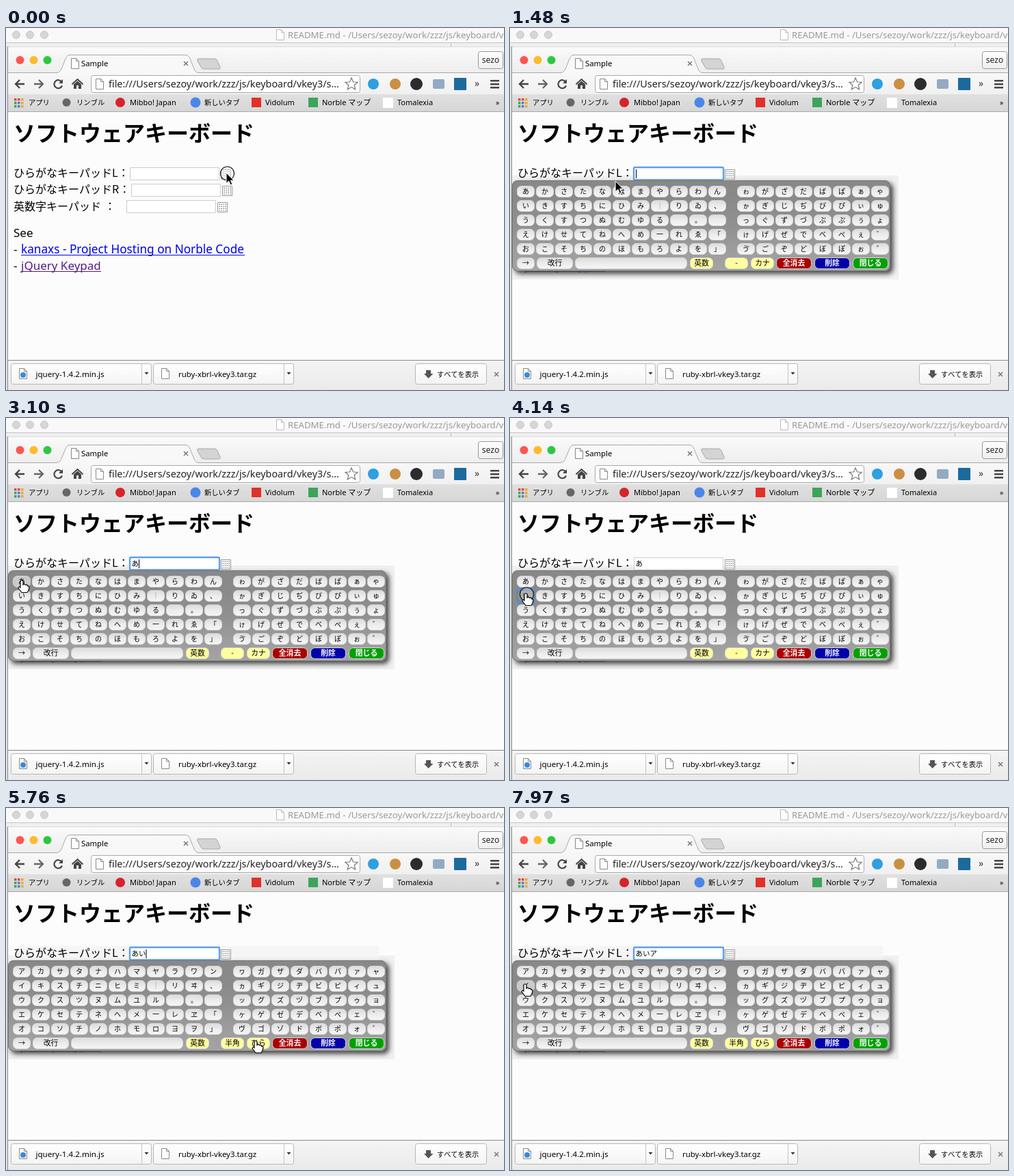
Animation, 728 px wide and 530 px high, one loop 8 s. Source, as an HTML page with a canvas:

```html
<!DOCTYPE html>
<html lang="ja">
<head>
<meta charset="utf-8">
<style>
html, body { margin: 0; width: 100%; height: 100%; overflow: hidden; }
canvas { display: block; }
</style>
</head>
<body>
<canvas id="stage" width="728" height="530"></canvas>
<script>
const g = document.getElementById('stage').getContext('2d');
const UI = '"Noto Sans", "Noto Sans CJK JP", "Noto Sans CJK", sans-serif';
const JP = '"Noto Sans CJK JP", "Noto Sans CJK", sans-serif';
const LOOP = 8000, TICK = 147.5;

function text(s, x, y, size, color = '#000', { font = UI, align = 'left', weight = 400 } = {}) {
  g.font = `${weight} ${size}px ${font}`;
  g.textAlign = align;
  g.fillStyle = color;
  g.fillText(s, x, y);
}
function paint(path, fill, stroke, width = 1) {
  if (fill) { g.fillStyle = fill; g.fill(path); }
  if (stroke) { g.strokeStyle = stroke; g.lineWidth = width; g.stroke(path); }
}
function box(x, y, w, h, fill, stroke, r = 0, width = 1) {
  const p = new Path2D();
  p.roundRect(x, y, w, h, r);
  paint(p, fill, stroke, width);
}
function dot(x, y, r, fill, stroke, width) {
  const p = new Path2D();
  p.arc(x, y, r, 0, 7);
  paint(p, fill, stroke, width);
}
function shape(d, fill, stroke, width, x = 0, y = 0) {
  g.save();
  g.translate(x, y);
  paint(new Path2D(d), fill, stroke, width);
  g.restore();
}
function fade(y0, y1, ...colors) {
  const f = g.createLinearGradient(0, y0, 0, y1);
  colors.forEach((c, i) => f.addColorStop(i / (colors.length - 1), c));
  return f;
}
const sheet = (x, y, color = '#888') =>
  shape('M.5 .5h7l4 4v11h-11zM7.5 .5v4h4', '#fff', color, 1, x, y);
const cross = (x, y) => shape('M-3-3L3 3M3-3L-3 3', null, '#777', 1.5, x, y);

function browser() {
  box(0, 0, 728, 530, '#fcfcfc');
  // window behind
  box(0, 0, 728, 21, '#f9f9f9');
  box(0, 21, 728, 6, '#efefef');
  box(0, 21, 728, 1, '#c4c4c4');
  box(650, 22, 1, 5, '#bbb');
  for (const x of [15, 35, 56]) dot(x, 10, 5.5, '#d6d6d6', '#c8c8c8');
  sheet(395, 2, '#bbb');
  text('README.md - /Users/sezoy/work/zzz/js/keyboard/vkey3', 412, 15, 13.2, '#999');

  // tab strip
  box(2, 27, 726, 38, fade(27, 65, '#fafafa', '#eeeeee'));
  box(2, 27, 726, 1, '#dcdcdc');
  ['#fc5650', '#fdbb2e', '#2cc83e'].forEach((c, i) => dot(20.5 + i * 20, 47, 6, c));
  shape('M281 45h24q3 0 4 3l4 9q1 3-2 3h-22q-3 0-4-3l-5-9q-1-3 1-3z', '#d4d4d4', '#a8a8a8');
  box(2, 65, 726, 32, fade(65, 97, '#f8f8f8', '#f0f0f0'));
  shape('M2 65.5H74Q79 65 81 60L87 45Q89 39.5 94 39.5H262Q267 39.5 269 45L275 60Q277 65 282 65.5', '#f8f8f8');
  shape('M2 65.5H74Q79 65 81 60L87 45Q89 39.5 94 39.5H262Q267 39.5 269 45L275 60Q277 65.5 282 65.5H728', null, '#a8a8a8');
  sheet(95, 44);
  text('Sample', 110, 56, 11.3);
  cross(263, 52);
  box(690.5, 34.5, 36, 25, fade(34, 60, '#fff', '#eee'), '#999', 3);
  text('sezo', 708.5, 51, 12, '#222', { align: 'center' });

  // toolbar
  shape('M27 82H14M20 76L14 82L20 88', null, '#444', 2.3);
  shape('M41 82H54M48 76L54 82L48 88', null, '#666', 2.3);
  shape('M81.500 79A6 6 0 1 0 82 84.500', null, '#444', 2.2);
  shape('M83 75v6h-6z', '#444');
  shape('M96.500 82.500L104.500 75L112.500 82.500', null, '#444', 2);
  shape('M99 82.500L104.500 77.500L110 82.500V89H106V84H103V89H99z', '#444');
  box(124.5, 69.5, 393, 25, '#fff', '#aaa', 3);
  sheet(131, 74);
  text('file:///Users/sezoy/work/zzz/js/keyboard/vkey3/s...', 150, 87, 14.35, '#222');
  shape('M0-9L2.600-3L9-2.500L4.200 1.700L5.700 8L0 4.600L-5.700 8L-4.200 1.700L-9-2.500L-2.600-3z', '#fff', '#777', 1.2, 505, 82);
  dot(537, 82, 8, '#2f9fe0');
  dot(569, 82, 8, '#c98f45');
  dot(600, 82, 9, '#2c2c2c');
  box(624, 75, 17, 14, '#93abc2', null, 2);
  box(655, 73, 18, 18, '#1b6a9c', null, 1);
  text('»', 685, 86, 14, '#333');
  for (let i = 0; i < 3; i++) box(708, 76 + i * 5, 13, 2.5, '#444');

  // bookmarks
  box(2, 97, 726, 26, fade(97, 123, '#e0e0e0', '#d6d6d6'));
  box(2, 122, 726, 1, '#a8a8a8');
  for (let i = 0; i < 9; i++)
    box(12 + i % 3 * 5, 103 + Math.floor(i / 3) * 5, 3.5, 3.5,
      ['#e04a3a', '#e04a3a', '#eda928', '#3fa657', '#4a82dd', '#eda928', '#3fa657', '#4a82dd', '#eda928'][i]);
  dot(88.5, 109, 6, '#666');
  dot(167, 109, 7, '#d6242c');
  dot(277, 109, 7.5, '#4a86e8');
  box(359, 102, 14, 14, '#e0302a');
  box(442, 102, 14, 14, '#3da45b');
  box(551, 102, 15, 15, '#fff');
  [['アプリ', 33], ['リンブル', 103], ['Mibbo! Japan', 181], ['新しいタブ', 290],
    ['Vidolum', 379], ['Norble マップ', 462], ['Tomalexia', 572], ['»', 716]]
    .forEach(([s, x]) => text(s, x, 113, /^[ -~]/.test(s) ? 11 : 10.3));

  // downloads
  box(2, 487, 726, 43, fade(487, 530, '#f4f4f4', '#eaeaea'));
  box(2, 486, 726, 1, '#8a8a8a');
  for (const x of [7.5, 215.5]) {
    box(x, 491.5, 205, 30, fade(491, 521, '#fff', '#f4f4f4'), '#b8b8b8', 3);
    box(x + 190.5, 492, 1, 29, '#c4c4c4');
    shape('M0 0h6l-3 3.500z', '#333', null, 1, x + 195, 504);
  }
  sheet(19, 498);
  dot(25, 508, 4, '#3b8ad8');
  sheet(227, 498);
  text('jquery-1.4.2.min.js', 43.5, 511, 11.6);
  text('ruby-xbrl-vkey3.tar.gz', 252, 511, 11.35);
  box(598.5, 491.5, 104, 30, fade(491, 521, '#fff', '#f4f4f4'), '#b8b8b8', 3);
  shape('M614 501h7v5h3.500L617.500 513L611 506h3z', '#555');
  text('すべてを表示', 630, 510.5, 10.2);
  cross(717, 507);
  box(0, 27, 2, 503, '#e2e2e2');
  box(2, 27, 1, 503, '#8c8c8c');
}

function padIcon(x, y) {
  box(x + .5, y + .5, 14, 14, '#fff', '#999');
  for (let r = 0; r < 4; r++)
    for (let c = 0; c < 4; c++)
      box(x + 2.5 + c * 3, y + 2.5 + r * 3, 1.5, 1.5, r < 3 ? '#888' : c < 3 ? '#7a9' : '#c77');
}

function page() {
  const jp = { font: JP };
  text('ソフトウェアキーボード', 11, 166, 32, '#000', { font: JP, weight: 700 });
  text('ひらがなキーパッドL：', 11, 218, 16, '#000', jp);
  text('ひらがなキーパッドR：', 11, 242, 16, '#000', jp);
  text('英数字キーパッド', 11, 267, 16, '#000', jp);
  text('：', 144, 267, 16, '#000', jp);
  for (const [x, y] of [[181, 204], [183, 228], [176, 252]]) {
    box(x + .5, y + .5, 130, 18, '#fff', '#ccc');
    padIcon(x + 133, y + 3);
  }
  text('See', 11, 306, 17);
  text('-', 11, 330, 17);
  text('kanaxs - Project Hosting on Norble Code', 22, 330, 17.2, '#0000ee');
  box(22, 332, 327, 1, '#0000ee');
  text('-', 11, 354, 17);
  text('jQuery Keypad', 22, 354, 17, '#551a8b');
  box(22, 356, 117, 1, '#551a8b');
}

const LEFT = ['あかさたなはまやらわん', 'いきすちにひみ｜りゐ、', 'うくすつぬむゆる　。　',
  'えけせてねへめ一れゑ「', 'おこそちのほもろよを」'];
const RIGHT = ['ゎがざだばぱぁゃ', 'ゕぎじぢびぴぃゅ', 'っぐずづぶぷぅょ', 'ゖげぜでべぺぇ゛', 'ゔごぞどぼぽぉ゜'];
const toKata = s => s.replace(/[ぁ-ゖ]/g, c => String.fromCharCode(c.charCodeAt(0) + 0x60));

function key(label, x, y, w, { fill, color = '#000', weight, hover, held } = {}) {
  if (held) box(x - 1, y - 3, w + 2, 23, '#5c8fc8', null, 4);
  const face = held ? '#8f8f8f' : fill || (hover ? '#cacaca' : fade(y, y + 17, '#dadada', '#ececec', '#f6f6f6'));
  box(x + .5, y + .5, w - 1, 16, face, held ? '#777' : '#d8d8d8', 6);
  const tint = label === '｜' ? '#cc6a33' : color;
  text(label, x + w / 2, y + 12.3, w < 30 ? 10 : 10.8, tint, { font: JP, align: 'center', weight });
}

function keyboard(kata, hand, held) {
  g.save();
  g.shadowColor = '#444';
  g.shadowBlur = 7;
  g.shadowOffsetX = g.shadowOffsetY = 4;
  box(3, 223, 553, 133, '#8c8c8c', null, 8);
  g.restore();
  box(3.5, 223.5, 552, 132, fade(223, 356, '#888', '#8a8a8a', '#909090', '#9c9c9c', '#a4a4a4'), '#777', 8);

  const put = (label, x, y, w, style = {}) => {
    const over = hand && hand[0] > x && hand[0] < x + w && hand[1] > y - 4 && hand[1] < y + 15;
    key(label, x, y, w, { ...style, hover: over, held: over && held });
  };
  [[LEFT, 10], [RIGHT, 332]].forEach(([rows, x]) => rows.forEach((row, r) =>
    [...(kata ? toKata(row) : row)].forEach((c, i) => put(c, x + i * 28, 231 + r * 21, 26))));
  const yellow = { fill: '#ffffa0' };
  const strong = fill => ({ fill, color: '#fff', weight: 700 });
  [['→', 10, 26], ['改行', 39, 53], ['', 95, 164], ['英数', 263, 34, yellow],
    [kata ? '半角' : '-', 314, 34, yellow], [kata ? 'ひら' : 'カナ', 352, 34, yellow],
    ['全消去', 389, 52, strong('#aa0000')], ['削除', 445, 52, strong('#0000aa')],
    ['閉じる', 501, 52, strong('#00a000')]]
    .forEach(([s, x, w, style]) => put(s, x, 336, w, style));
}

// [tick, x, y]
const TRACK = [[0, 322, 212], [5, 322, 212], [14, 34, 233], [15, 34, 233], [17, 23, 238], [21, 23, 238],
  [25, 23, 257], [30, 23, 257], [33, 358, 332], [35, 358, 332], [36, 365, 341], [39, 365, 341],
  [43, 26, 261], [47, 23, 238], [51, 23, 238], [54, 22, 258]];
const CLICKS = [[0, 2], [18, 20], [27, 29], [36, 38], [49, 50]];

function pointerAt(n) {
  const i = TRACK.findIndex(k => k[0] >= n);
  if (i < 1) return TRACK[i < 0 ? TRACK.length - 1 : 0].slice(1);
  const [a, x0, y0] = TRACK[i - 1], [b, x1, y1] = TRACK[i];
  const u = (n - a) / (b - a), e = u * u * (3 - 2 * u);
  return [x0 + (x1 - x0) * e, y0 + (y1 - y0) * e];
}

function input(n, held) {
  const typed = n >= 50 ? 'あいア' : n >= 29 ? 'あい' : n >= 20 ? 'あ' : '';
  const focus = n >= 2 && !held;
  if (focus) box(181, 204, 131, 18.5, '#fff', '#5fa0e8', 2, 2.4);
  text(typed, 183.5, 217, 10.5, '#000', { font: JP });
  const since = CLICKS.map(c => c[1]).filter(e => e <= n).pop();
  if (focus && Math.floor((n - since) / 3.6) % 2 === 0)
    box(184 + g.measureText(typed).width - (typed ? .5 : 0), 207, 1, 13, '#000');
}

function draw(now) {
  const n = Math.floor((now % LOOP + 10) / TICK);
  const [x, y] = pointerAt(n);
  const held = CLICKS.some(([a, b]) => n >= a && n < b);
  const hand = n >= 16, kata = n >= 38;
  browser();
  if (n >= 2) box(3, 216, 565, 152, '#f0f0f0');
  if (kata) box(18, 202, 527, 20, '#f5f5f5');
  page();
  input(n, held);
  if (n >= 2) {
    g.globalAlpha = [.3, .7][n - 2] || 1;
    keyboard(kata, hand && [x, y], held);
    g.globalAlpha = 1;
  }
  if (held) dot(x + 1.5, y + 1, 10, 'rgba(255,255,255,.3)', '#111', 1.2);
  if (hand)
    shape('M-2 8V1Q0-1.500 2 1V6Q4 4 5.500 6.500Q8 5 8.700 8Q11 7.500 11 10L10 14L8 17.500H0L-5 11Q-4 8-2 10z',
      '#fff', '#000', 1.2, x, y);
  else
    shape('M0 0V15.500L3.700 12L6.300 17.800L8.800 16.700L6.300 11.200H11z', '#000', '#fff', 1, x, y);
  requestAnimationFrame(() => draw(performance.now() - start));
}
const start = performance.now();
draw(0);
</script>
</body>
</html>
```
